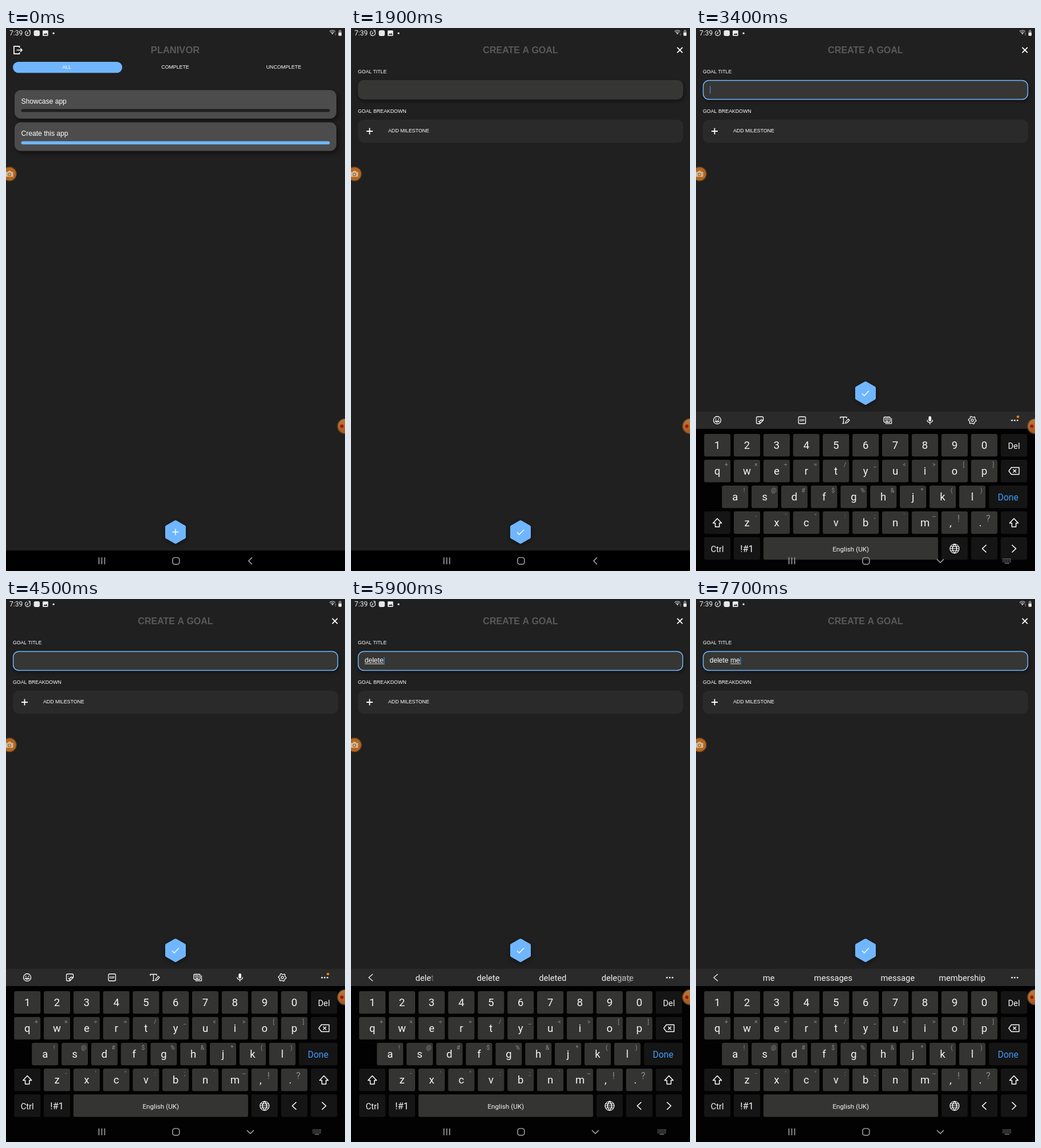
These frames come from a looping animation (592 by 947 pixels, 8000 ms). An HTML page with a canvas:

```html
<!DOCTYPE html>
<html lang="en">
<head>
<meta charset="utf-8">
<title>Goal app</title>
<style>
html, body { margin: 0; width: 100%; height: 100%; overflow: hidden; background: #202020; }
canvas { display: block; width: 592px; height: 947px; }
</style>
</head>
<body>
<canvas id="stage"></canvas>
<script>
const canvas = document.getElementById('stage');
const c = canvas.getContext('2d');
const dpr = window.devicePixelRatio || 1;
canvas.width = 592 * dpr;
canvas.height = 947 * dpr;

const SANS = '"Liberation Sans", Arial, sans-serif';
const ROBOTO = 'Roboto, sans-serif';
const BLUE = '#70b6ff', BG = '#202020', KEY = '#343432', DARK = '#151515', PRESSED = '#6c6c6a';

function text(s, x, y, size, color = '#fff', align = 'left', family = SANS, weight = 400) {
  c.font = `${weight} ${size}px ${family}`;
  c.textAlign = align;
  c.fillStyle = color;
  c.fillText(s, x, y);
}

function box(x, y, w, h, r, fill, stroke, line = 1) {
  c.beginPath();
  c.roundRect(x, y, w, h, r);
  if (fill) { c.fillStyle = fill; c.fill(); }
  if (stroke) { c.strokeStyle = stroke; c.lineWidth = line; c.stroke(); }
}

function disc(x, y, r, fill) {
  c.beginPath();
  c.arc(x, y, r, 0, 7);
  c.fillStyle = fill;
  c.fill();
}

function icon(d, x, y, color = '#fff', line = 1.3, fill = false) {
  const p = new Path2D(d);
  c.save();
  c.translate(x, y);
  c.lineWidth = line;
  c.lineJoin = 'round';
  c.strokeStyle = c.fillStyle = color;
  fill ? c.fill(p) : c.stroke(p);
  c.restore();
}

const ring = r => `M${r},0A${r},${r} 0 1 1 ${-r},0A${r},${r} 0 1 1 ${r},0`;

function shadowed(blur, dx, dy, draw) {
  c.save();
  c.shadowColor = 'rgba(0,0,0,.5)';
  c.shadowBlur = blur * dpr;
  c.shadowOffsetX = dx * dpr;
  c.shadowOffsetY = dy * dpr;
  draw();
  c.restore();
}

function hexButton(y, mark) {
  const d = 'M-1.5,-20Q0,-20.8 1.5,-20L16.8,-11.2Q18,-10.4 18,-9V9Q18,10.4 16.8,11.2L1.5,20Q0,20.8 -1.5,20L-16.8,11.2Q-18,10.4 -18,9V-9Q-18,-10.4 -16.8,-11.2Z';
  shadowed(8, 0, 2, () => icon(d, 296, y, BLUE, 1, true));
  icon(mark, 296, y, '#fff', 1.4);
}

function statusBar(t) {
  text('7:39', 6, 13.3, 12, '#f2f2f2', 'left', ROBOTO);
  icon('M2.5,-3.8A4.5,4.5 0 1 1 -1.5,-4.3M0,-2.5V.5L-2,1.5M1,-5.5L4.2,-4.6L3.6,-1.4', 38, 9, '#eee', 1.2);
  box(48.5, 4, 10.5, 10, 3, '#e8e8e8');
  box(64, 4.3, 9.6, 9.4, 1.2, '#f0f0f0');
  icon('M-3.4,3L-1.4,.2L0,1.9L1.6,-.6L3.6,3Z', 68.8, 9, BG, 1, true);
  disc(83, 9.2, 1.6, '#eee');
  icon('M-5,-2Q0,-6 5,-2M-3.3,0Q0,-2.7 3.3,0', 570, 8, '#ccc', 1.2);
  icon('M-2,1Q0,-.6 2,1L0,3.6Z', 570, 8, '#ccc', 1, true);
  icon('M-1.2,-.2L0,-1.5L1.2,-.2Z', 575.3, 9.7, t >= 2400 ? '#eee' : '#777', 1, true);
  icon('M-1.2,.2L0,1.5L1.2,.2Z', 575.3, 11.3, '#ccc', 1, true);
  box(580.6, 4.5, 5.4, 9, 1, '#777');
  box(580.6, 8, 5.4, 5.5, 1, '#eee');
  box(582, 3.4, 2.6, 1.4, 0, '#999');
}

function goalCard(y, title, color) {
  shadowed(8, 3, 4, () => box(15, y, 562, 49.8, 11, '#4c4c4c'));
  text(title, 26.5, y + 23.3, 12.1);
  box(26.5, y + 33, 539, 5.4, 2.7, color);
}

function homePage() {
  icon('M3,-4V-6.6H-6.6V6.6H3V4M-2,0H7.5M4.6,-3L7.6,0L4.6,3', 20.5, 38.5, '#fff', 1.7);
  text('PLANIVOR', 295.5, 43.8, 16.5, '#595959', 'center', SANS, 700);
  box(12, 59, 191, 19.3, 9.6, BLUE);
  text('ALL', 106, 71, 8.8, '#fff', 'center');
  text('COMPLETE', 295.5, 71, 8.8, '#fff', 'center');
  text('UNCOMPLETE', 485, 71, 8.8, '#fff', 'center');
  goalCard(108.2, 'Showcase app', BG);
  goalCard(164.6, 'Create this app', BLUE);
  hexButton(879, 'M-5.5,0H5.5M0,-5.5V5.5');
}

// Typing: press time and character
const strokes = [[4900, 'd'], [5100, 'e'], [5300, 'l'], [5400, 'e'], [5600, 't'], [5700, 'e'], [6200, ' '], [6400, 'm'], [6700, 'e']];

function goalPage(t, hexY) {
  text('CREATE A GOAL', 296, 43.6, 16, '#595959', 'center', SANS, 700);
  icon('M-4.6,-4.6L4.6,4.6M4.6,-4.6L-4.6,4.6', 574.3, 38.5, '#fff', 1.8);
  text('GOAL TITLE', 12, 79.4, 8.7);
  shadowed(7, 1, 3, () => box(12, 90.8, 568, 34, 10, '#363634'));
  text('GOAL BREAKDOWN', 12, 148.2, 8.8);
  box(12, 160, 568, 40.3, 10, '#2a2a2a');
  icon('M-5.5,0H5.5M0,-5.5V5.5', 32.5, 180, '#fff', 1.8);
  text('ADD MILESTONE', 65, 182.2, 8.8);

  if (t >= 3000) {
    c.save();
    c.globalAlpha = Math.min(1, (t - 2900) / 200);
    box(12.6, 91.4, 566.8, 33.2, 10, null, BLUE, 1.5);
    c.restore();
    const typed = strokes.filter(s => s[0] <= t);
    const value = typed.map(s => s[1]).join('');
    text(value, 23.7, 111, 12.1);
    const end = 23.7 + c.measureText(value).width;
    const word = value.split(' ').pop();
    const w = c.measureText(word).width;
    box(end - w, 112.5, w, 1, 0, '#e8e8e8');
    const since = t - (typed.length ? typed.at(-1)[0] : 3000);
    if (since % 1000 < 500) box(end + .5, 101, 1.2, 13.4, 0, '#3f8ff0');
  }
  hexButton(hexY, 'M-6,.6L-2.2,4.4L6,-4');
}

// Suggestions: start time and the four words
const hints = [
  [5000, 'd do did down'],
  [5200, 'de dear deal design'],
  [5400, 'del delivery delete deleted'],
  [5500, 'dele delete deleted delegate'],
  [5800, 'delet delete deleted deleting'],
  [6000, 'delete deleted deletes deleting'],
  [6200, 'the it all my'],
  [6500, 'm my me more'],
  [7000, 'me messages message membership']
].map(([at, words]) => ({ at, words: words.split(' ') }));

function suggestions(t) {
  const i = hints.findLastIndex(h => h.at <= t);
  const p = Math.min(1, (t - hints[i].at) / 300);
  const size = 14.6;
  c.font = `${size}px ${ROBOTO}`;
  const width = s => c.measureText(s).width;
  hints[i].words.forEach((word, n) => {
    const old = i ? hints[i - 1].words[n] : '';
    let k = 0;
    while (k < word.length && word[k] === old[k]) k++;
    const middle = 127 + 112.6 * n;
    const from = middle - width(old) / 2, to = middle - width(word) / 2;
    const x = from + (to - from) * p;
    const head = word.slice(0, k), tail = x + width(head);
    const put = (s, left, alpha) => {
      c.globalAlpha = alpha;
      text(s, left, 665.6, size, '#f2f2f2', 'left', ROBOTO);
    };
    put(head, x, 1);
    put(old.slice(k), tail, 1 - p);
    put(word.slice(k), tail, p);
    c.globalAlpha = 1;
  });
  icon('M3.5,-6L-3.5,0L3.5,6', 34.5, 660.3, '#eee', 1.4);
}

function tools() {
  const y = 660;
  icon(ring(6.5) + 'M-3.6,1.4Q0,5.5 3.6,1.4Z', 37, y);
  disc(34.6, y - 2, 1, '#fff');
  disc(39.4, y - 2, 1, '#fff');
  icon('M6,0V-4Q6,-6 4,-6H-4Q-6,-6 -6,-4V4Q-6,6 -4,6H0L6,0H2Q0,0 0,2V6M-3,1Q-2,3 0,3M-2.5,-2.5V-1.5M2.5,-2.5V-1.5', 111.5, y);
  box(179, y - 6, 12.4, 12, 2, null, '#fff', 1.3);
  text('GIF', 185.2, y + 2.4, 6, '#fff', 'center', ROBOTO, 700);
  icon('M-7,-3V-5.5H4V-3M-1.5,-5.5V5.5M-3.5,5.5H0M2,5.5L2.6,2.4L7,-2L9,0L4.8,4.5Z', 259, y);
  box(328, y - 5.5, 11, 9, 1.5, null, '#fff', 1.3);
  icon('M-4.5,-3H3M-4.5,-.8H3M-3,1.6H1.5', 334.2, y, '#fff', 1.1);
  icon('M-4,5.8H7V-3.5', 334.5, y, '#fff', 1.2);
  box(406.2, y - 7, 4.6, 9, 2.3, '#fff');
  icon('M-4.8,-.5Q-4.5,4 0,4Q4.5,4 4.8,-.5M0,4V7.3', 408.5, y);
  let gear = '';
  for (let i = 0; i < 24; i++) {
    const r = i % 4 < 2 ? 6.8 : 5.2, a = i * Math.PI / 12;
    gear += (i ? 'L' : 'M') + r * Math.cos(a) + ',' + r * Math.sin(a);
  }
  icon(gear + 'Z' + ring(2.1), 482.5, y);
  disc(562.2, 654, 2.3, '#f0800a');
}

function keyboard(t) {
  const last = strokes.findLast(s => s[0] <= t);
  const down = last && t - last[0] < 100 ? last[1] : '';
  const pitch = 51.8, left = 14.2, w = 46;
  box(0, 645, 592, 310, 0, '#020202');
  box(0, 645, 592, 30, 0, '#2a2a2a');
  t < 5000 ? tools() : suggestions(t);
  [551.8, 556.6, 561.4].forEach(x => disc(x, 660.3, 1.4, '#fff'));

  const rowY = r => 684 + 45 * r;
  const keyBg = (x, r, fill, kw = w) => box(x, rowY(r), kw, 39.3, 3, fill);
  const label = (s, x, r, size = 18.5, color = '#f4f4f4') =>
    text(s, x, rowY(r) + 25.8, size, color, 'center', ROBOTO);
  const row = (chars, marks, x0, r) => [...chars].forEach((ch, i) => {
    const x = x0 + pitch * i, big = ',.'.includes(ch);
    keyBg(x, r, ch === down ? PRESSED : KEY);
    label(ch, x + (big ? 16 : 23), r);
    if (marks) text(marks[i], x + (big ? 30 : 38.8), rowY(r) + (big ? 18 : 12), big ? 16 : 10.5, '#8c8c8c', 'center', ROBOTO);
  });

  row('1234567890', '', left, 0);
  row('qwertyuiop', '+×÷=/_<>[]', left, 1);
  row('asdfghjkl', '!@#$%&*()', 45.2, 2);
  row('zxcvbnm,.', '-\'":;`~!?', left + pitch, 3);

  const right = left + pitch * 10;
  keyBg(right, 0, DARK);
  label('Del', right + 23, 0, 14.7);
  keyBg(right, 1, DARK);
  icon('M-9,0L-4.5,-6H9V6H-4.5ZM-1.5,-2.8L4.1,2.8M4.1,-2.8L-1.5,2.8', right + 23, 748.5, '#fff', 1.4);
  keyBg(511.5, 2, DARK, 67.4);
  label('Done', 545, 2, 15.6, '#3f9bfd');
  for (const x of [left, right]) {
    keyBg(x, 3, DARK);
    icon('M0,-7.5L7.5,.5H3.6V7H-3.6V.5H-7.5Z', x + 23, 839, '#fff', 1.5);
  }
  keyBg(left, 4, DARK);
  label('Ctrl', left + 23, 4, 14.7);
  keyBg(left + pitch, 4, DARK);
  label('!#1', left + pitch + 23, 4, 16.5);
  keyBg(left + pitch * 2, 4, down === ' ' ? PRESSED : KEY, 305);
  text('English (UK)', 270.3, 888.6, 11.7, '#f4f4f4', 'center', ROBOTO);
  ['M-8,0H8M-7,-3.5H7M-7,3.5H7M0,-8Q-7.5,0 0,8Q7.5,0 0,-8' + ring(8), 'M3.5,-6.5L-3.5,0L3.5,6.5', 'M-3.5,-6.5L3.5,0L-3.5,6.5'].forEach((d, i) => {
    const x = left + pitch * (8 + i);
    keyBg(x, 4, DARK);
    icon(d, x + 23, 884, '#fff', i ? 1.7 : 1.2);
  });
}

function navBar(open) {
  const gray = '#999';
  icon('M-5,-6V6M0,-6V6M5,-6V6', 167.3, 929.3, gray, 1.7);
  box(291, 923.5, 11.8, 11.8, 3.8, null, gray, 1.7);
  icon(open ? 'M-6,-3L0,3L6,-3' : 'M3,-6L-3,0L3,6', 426.7, 929.3, gray, 1.7);
  if (!open) return;
  for (let r = 0; r < 3; r++)
    for (let i = 0; i < 6; i++) box(535.5 + i * 2.6, 925 + r * 2.6, 1.6, 1.6, 0, '#777');
  box(539, 932.8, 8, 1.5, 0, '#777');
}

function orbs() {
  disc(6, 254.5, 13, '#4d3a26');
  disc(6, 254.5, 11.6, '#b5651d');
  icon('M-6,-3.5H-3L-1.8,-5.5H2.2L3.4,-3.5H6.5V5H-6Z', 6, 254.5, '#cfb79c', 1, true);
  icon(ring(2.3), 6, 255.3, '#a0601f', 1.2);
  disc(592, 694.5, 14, '#4d3a26');
  const g = c.createLinearGradient(0, 682, 0, 707);
  g.addColorStop(0, '#b87b3c');
  g.addColorStop(1, '#a9581a');
  disc(592, 694.5, 12.4, g);
  disc(586.5, 694.5, 2.9, '#a3120c');
}

function draw(t) {
  c.setTransform(dpr, 0, 0, dpr, 0, 0);
  box(0, 0, 592, 947, 0, BG);
  const rise = t < 3300 ? 302 : Math.floor(120 * .2 ** ((t - 3300) / 100) + 1e-6);
  const open = t >= 3300;

  c.save();
  c.beginPath();
  c.rect(0, 20, 592, 891);
  c.clip();
  if (t < 1100) homePage();
  if (t >= 900) {
    const p = Math.min(1, (t - 800) / 300), e = 1 - (1 - p) ** 2;
    c.globalAlpha = e;
    c.translate(0, 70 * (1 - e));
    box(0, 20, 592, 891, 0, BG);
    goalPage(t, Math.min(879, 612.8 + rise));
  }
  c.restore();

  statusBar(t);
  box(0, 911.3, 592, 36, 0, '#000');
  if (open) {
    c.save();
    c.translate(0, rise);
    keyboard(t);
    c.restore();
  }
  navBar(open);
  orbs();
}

const start = performance.now();
function tick() {
  const t = (performance.now() - start) % 8000;
  draw(Math.floor(t / 100) * 100); // ten pictures a second
  requestAnimationFrame(tick);
}
tick();
</script>
</body>
</html>
```
